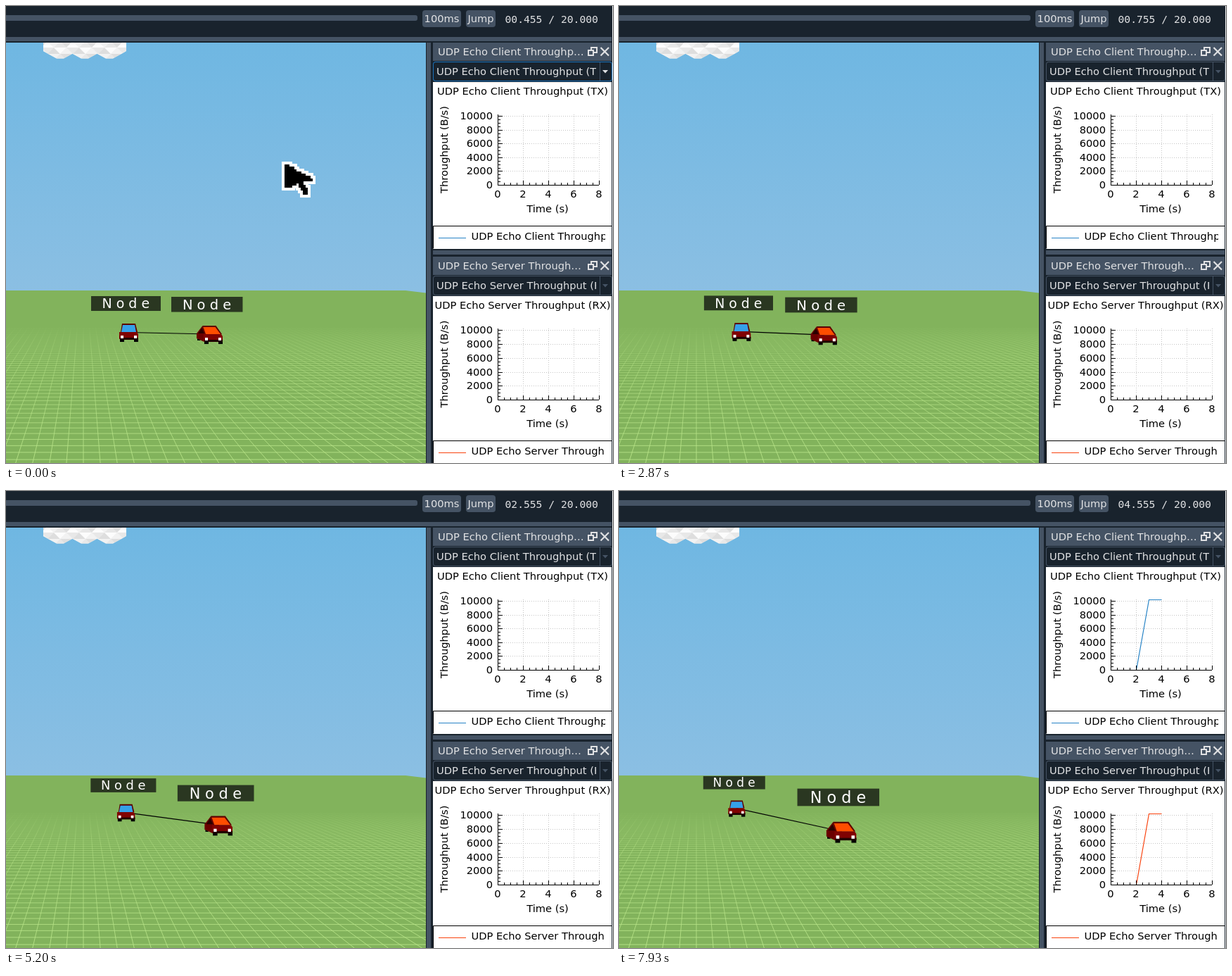
Write an HTML page with a canvas that moves like this. It is 863 px wide and 649 px high and loops after 8000 ms.

```html
<!DOCTYPE html>
<html lang="en">
<head>
<meta charset="utf-8">
<title>Network simulation playback</title>
<style>
html, body { margin: 0; width: 100%; height: 100%; overflow: hidden; background: #19232d; }
canvas { display: block; }
</style>
</head>
<body>
<canvas id="stage" width="863" height="649"></canvas>
<script>
const ctx = document.getElementById('stage').getContext('2d');
const LOOP = 8000;
const DARK = '#19232d', GREY = '#455364', HOVER = '#60798b', LIGHT = '#e0e1e3';
const SANS = '14.667px "DejaVu Sans", sans-serif';
const MONO = '14.667px "DejaVu Sans Mono", monospace';
const LABEL = '19px "DejaVu Sans", sans-serif';
const VIEW = { w: 597, top: 52, horizon: 404, bottom: 649 };
const VP = { x: 110, y: 348 };   // vanishing point of the ground and of both cars

function rect(x, y, w, h, color) {
  ctx.fillStyle = color;
  ctx.fillRect(x, y, w, h);
}

function pill(x, y, w, h, r, color) {
  ctx.fillStyle = color;
  ctx.beginPath();
  ctx.roundRect(x, y, w, h, r);
  ctx.fill();
}

function trace(pts) {
  ctx.beginPath();
  for (let i = 0; i < pts.length; i += 2) ctx.lineTo(pts[i], pts[i + 1]);
}

function poly(color, ...pts) {
  ctx.fillStyle = color;
  trace(pts);
  ctx.fill();
}

function line(color, width, ...pts) {
  ctx.strokeStyle = color;
  ctx.lineWidth = width;
  trace(pts);
  ctx.stroke();
}

function text(str, x, y, color, align = 'left', font = SANS) {
  ctx.font = font;
  ctx.textAlign = align;
  ctx.fillStyle = color;
  ctx.fillText(str, x, y);
}

function clipped(x, y, w, h, draw) {
  ctx.save();
  ctx.beginPath();
  ctx.rect(x, y, w, h);
  ctx.clip();
  draw();
  ctx.restore();
}

// The simulation advances 0.1 s per tick, with one short stall
function ticksAt(t) {
  const stall = t > 6230 ? 67 : 0;
  return Math.max(0, Math.floor((t - 2530 - stall) / 133.3) + 1);
}

// ---- 3D view ----

function sky() {
  const g = ctx.createLinearGradient(0, VIEW.top, 0, VIEW.horizon);
  g.addColorStop(0, '#6fb7e2');
  g.addColorStop(1, '#8bbfe3');
  rect(0, VIEW.top, VIEW.w, 360, g);
}

function ground() {
  const { w, horizon, bottom } = VIEW, start = 455;
  poly('#82b35c', 0, horizon, 568, horizon, w, horizon + 3.5, w, bottom, 0, bottom);
  const fade = ctx.createLinearGradient(0, start, 0, bottom);
  fade.addColorStop(0, 'rgba(184,228,136,0)');
  fade.addColorStop(0.25, 'rgba(184,228,136,0.45)');
  fade.addColorStop(1, 'rgba(184,228,136,0.9)');
  for (let n = 27; n < 78; n++) {
    const y = VP.y + 8291 / n;
    line(fade, 1, 0, y, w, y + 0.01);
  }
  for (let i = -14; i < 60; i++) {
    const slope = i * 0.08;
    line(fade, 1, VP.x + slope * (start - VP.y), start,
      VP.x + slope * (bottom - VP.y) + 0.01, bottom);
  }
}

function cloud() {
  const outline = [53, 52, 53, 64];
  for (let c = 77; c < 150; c += 35) {
    outline.push(c - 17, 68, c - 5, 74.5, c + 5, 74.5, c + 17, 68);
  }
  outline.push(171, 64, 171, 52);
  ctx.save();
  trace(outline);
  ctx.clip();
  rect(53, 52, 118, 24, '#f3f3f3');
  for (let row = 0; row < 3; row++) {
    for (let i = 0; i < 14; i++) {
      const x = 50 + i * 9, y = 50 + row * 9, up = (i + row) % 2;
      const shade = 222 + (i * 3 + row * 2) % 4 * 10;
      poly(`rgb(${shade},${shade},${shade})`,
        x - 9, y + 9 * up, x + 9, y + 9 * up, x, y + 9 * (1 - up));
    }
  }
  ctx.restore();
}

// x, y: top left of the front; side: width of the visible flank
function car(x, y, side, glass) {
  const shift = -0.55 * side;
  for (const wx of [x + 1, x + 21]) rect(wx, y + 20, 6, 6, '#000');
  if (side) {
    rect(x - side + 1, y + 15, 4, 6, '#000');
    poly('#6a0000', x + 3, y + 12, x + 4 + shift, y, x - side, y + 11,
      x - side, y + 18, x + 1, y + 23);
    poly('#2a0000', x + 1, y + 11, x + 3 + shift, y + 3, x - side + 2, y + 11);
  }
  poly('#5c0000', x + 2, y + 12, x + 4 + shift, y, x + 23 + shift, y, x + 26, y + 12);
  poly(glass, x + 3, y + 12, x + 5 + shift, y + 2, x + 22 + shift, y + 2, x + 24, y + 12);
  poly('#800202', x, y + 12, x + 25, y + 12, x + 27, y + 15, x + 27, y + 22, x, y + 22);
  rect(x + 1, y + 20, 26, 3, '#200000');
  for (const lx of [x + 2, x + 21]) rect(lx, y + 17, 4, 4, '#fff');
}

function nodeLabel(x, y, size) {
  ctx.save();
  ctx.translate(x, y);
  ctx.scale(size, size);
  rect(0, 0, 99, 21, '#2a3721');
  ctx.letterSpacing = '6px';
  text('Node', 15.5, 17.3, '#fff', 'left', LABEL);
  ctx.restore();
}

function fromVP(scale, draw) {
  ctx.save();
  ctx.translate(VP.x, VP.y);
  ctx.scale(scale, scale);
  ctx.translate(-VP.x, -VP.y);
  draw();
  ctx.restore();
}

function scene(n) {
  // Depth changes linearly, so the scale is its reciprocal
  const far = 1 / (1 + 0.00305 * n), near = 1 / (1 - 0.00315 * n);
  const at = (x, y, s) => [VP.x + (x - VP.x) * s, VP.y + (y - VP.y) * s];
  sky();
  ground();
  cloud();
  line('#000', 1.2, ...at(174, 463.5, far), ...at(290, 466, near));
  fromVP(far, () => {
    car(161, 451, 0, '#35a0e8');
    nodeLabel(121, 412, 1);
  });
  fromVP(near, () => {
    car(281, 454, 10, '#ff4d00');
    nodeLabel(235, 413, 1.025);
  });
}

// ---- panels ----

function toolbar(t, n) {
  rect(0, 0, 862, 52, DARK);
  pill(-10, 13, 595, 8, 3, GREY);
  pill(592, 6, 55, 24, 4, GREY);
  pill(654, 6, 42, 24, 4, GREY);
  text('100ms', 619.5, 23, LIGHT, 'center');
  text('Jump', 675, 23, LIGHT, 'center');
  const clock = (0.455 + n / 10).toFixed(3).padStart(6, '0');
  text(clock + ' / 20.000', 709.5, 24, LIGHT, 'left', MONO);
  rect(0, 44, 861, 6, t >= 530 && t < 670 ? HOVER : GREY);
}

function dockTitle(y, title) {
  rect(607, y, 254, 26, GREY);
  text(title, 614, y + 18, LIGHT);
  ctx.strokeStyle = LIGHT;
  ctx.lineWidth = 2;
  ctx.strokeRect(832, y + 7, 8, 7);
  rect(827, y + 10, 9, 9, GREY);
  ctx.strokeRect(828, y + 11, 7, 7);
  line(LIGHT, 2.2, 845.5, y + 7, 857, y + 18.5);
  line(LIGHT, 2.2, 857, y + 7, 845.5, y + 18.5);
}

function combo(y, label, focused) {
  pill(607, y, 255, 28, 4, focused ? '#1a72bb' : GREY);
  pill(608, y + 1, 253, 26, 3, DARK);
  clipped(608, y, 231, 28, () => text(label, 612, y + 19, LIGHT));
  rect(844, y + 1, 1, 26, GREY);
  poly(focused ? LIGHT : GREY, 848, y + 12, 856, y + 12, 852, y + 16.5);
}

function chart(y, title, color, top, bottom, sim) {
  const left = 699, right = 843, max = 10240;
  const px = s => left + 0.5 + s * (right - left) / 8;
  const py = v => bottom + 0.5 - v * (bottom - top) / max;
  const crisp = v => Math.floor(v) + 0.5;

  rect(607, y, 254, bottom + 91 - y, '#fff');
  text(title, 734.5, y + 18, '#000', 'center');

  ctx.setLineDash([1, 2]);
  for (let s = 2; s <= 8; s += 2) {
    line('#c4c4c4', 1, crisp(px(s)), top, crisp(px(s)), bottom);
  }
  for (let v = 2000; v < max; v += 2000) {
    line('#c4c4c4', 1, left, crisp(py(v)), right, crisp(py(v)));
  }
  ctx.setLineDash([]);

  // Samples arrive once per second; traffic starts after the second one
  const pts = [px(2), py(0)];
  for (let s = 3; s <= sim; s++) pts.push(px(s), py(max));
  line(color, 1.2, ...pts);

  line('#000', 1, left + 0.5, top, left + 0.5, bottom + 0.5, right, bottom + 0.5);
  for (let i = 0; i <= 20; i++) {
    const ty = crisp(py(i * 500)), major = i % 4 === 0;
    line('#000', 1, left, ty, left + (major ? 7 : 4), ty);
    if (major) text(String(i * 500), 692, ty + 4.5, '#000', 'right');
  }
  for (let i = 0; i <= 16; i++) {
    const x = crisp(px(i / 2)), major = i % 4 === 0;
    line('#000', 1, x, bottom, x, bottom - (major ? 6 : 3));
    if (major) text(String(i / 2), x - 0.5, bottom + 18, '#000', 'center');
  }
  text('Time (s)', 770, bottom + 39, '#000', 'center');

  ctx.save();
  ctx.translate(628, (top + bottom) / 2);
  ctx.rotate(-Math.PI / 2);
  text('Throughput (B/s)', 0, 0, '#000', 'center');
  ctx.restore();

  const ly = bottom + 58.5;
  line('#000', 1, 861, ly, 607.5, ly, 607.5, ly + 32);
  line(color, 1, 615, ly + 17, 654, ly + 17);
  clipped(655, ly, 197, 32, () => text(title, 661.5, bottom + 78, '#000'));
}

function panels(t, n) {
  const sim = 0.455 + n / 10;
  const client = 'UDP Echo Client Throughput (TX)';
  const server = 'UDP Echo Server Throughput (RX)';
  rect(VIEW.w, 50, 862 - VIEW.w, 599, DARK);
  rect(598, 52, 6, 597, GREY);
  rect(607, 347, 254, 6, GREY);
  dockTitle(52, 'UDP Echo Client Throughp…');
  combo(79, client, t < 2670);
  chart(108, client, '#2683c6', 154, 254, sim);
  dockTitle(356, 'UDP Echo Server Through…');
  combo(383, server, false);
  chart(412, server, '#f9430f', 458, 559, sim);
  rect(862, 0, 1, 649, '#f0f0f0');
}

// ---- pointer ----

// The arrow is rasterised once into coarse cells
const CELL = 3.25;
const arrow = new Path2D('M0 -.5 L12.4 6.5 L7.5 7.6 L11 12.2 L9 13.4 L5.6 8.4 L0 10.6Z');
const cells = [];
for (let r = 0; r < 13; r++) {
  for (let c = 0; c < 13; c++) {
    if (ctx.isPointInPath(arrow, c + 0.5, r + 0.5)) cells.push([c * CELL, r * CELL]);
  }
}

function pointer(x, y) {
  for (const [color, pad] of [['#fff', 4], ['#000', 0]]) {
    for (const [dx, dy] of cells) {
      rect(Math.round(x + dx) - pad, Math.round(y + dy) - pad, 4 + 2 * pad, 4 + 2 * pad, color);
    }
  }
}

// Moves from one point to another in steps of 67 ms
function glide(t, t0, t1, [x0, y0], [x1, y1]) {
  const step = Math.floor((t - t0) / 66.6) * 66.6;
  const k = Math.min(1, Math.max(0, step / (t1 - t0)));
  pointer(x0 + (x1 - x0) * k, y0 + (y1 - y0) * k);
}

function drawPointer(t) {
  const rest = [685, 512];
  if (t < 270) glide(t, 0, 200, [396, 225], [38, 63]);
  else if (t >= 2930 && t < 3330) glide(t, 2930, 3260, [612, 655], rest);
  else if (t >= 3330 && t < 3730) glide(t, 3330, 3730, rest, [692, 655]);
}

function frame(now) {
  const t = now % LOOP;
  const n = ticksAt(t);
  clipped(0, VIEW.top, VIEW.w, VIEW.bottom - VIEW.top, () => scene(n));
  toolbar(t, n);
  panels(t, n);
  drawPointer(t);
}

let start;
function loop(now) {
  start ??= now;
  frame(now - start);
  requestAnimationFrame(loop);
}
frame(0);
requestAnimationFrame(loop);
</script>
</body>
</html>
```
